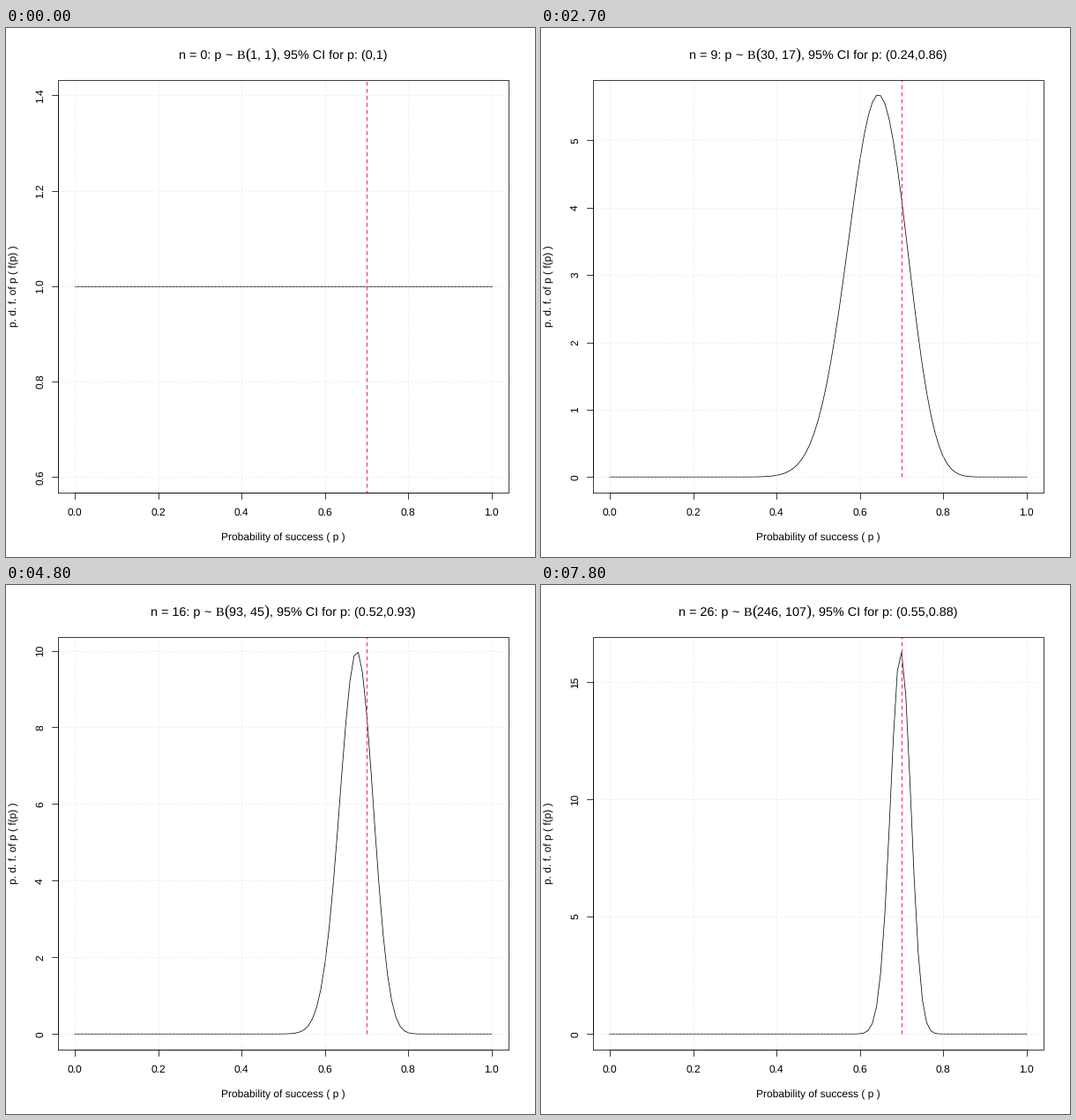
Write a matplotlib script that moves like this. It is 600 px wide and 600 px high and loops after 8 s.

```python
import math

import matplotlib.pyplot as plt
import numpy as np
from matplotlib.animation import FuncAnimation
from matplotlib.patches import Rectangle
from matplotlib.textpath import TextPath

SIZE = 600
INTERVAL = 100
FRAMES = 80
FRAMES_PER_TRIAL = 3
LAST_TRIAL = 26
TRUE_P = 0.7
FAILED_TRIALS = {2, 5, 8, 9, 17, 19, 23}

LEFT, RIGHT, TOP, BOTTOM = 59.04, 569.76, 59.04, 526.56
TICK = 7.2
THIN = 0.75
GRID = "#d3d3d3"
RED = "#ff4060"
SANS, SERIF = "Liberation Sans", "Liberation Serif"

plt.rcParams.update({
    "font.family": SANS,
    "text.hinting": "none",
    "text.hinting_factor": 8,
    "lines.scale_dashes": False,
    "lines.dash_capstyle": "butt",
})

fig = plt.figure(figsize=(SIZE / 72, SIZE / 72), dpi=72, facecolor="white")
ax = fig.add_axes([0, 0, 1, 1])


def beta_pdf(x, a, b):
    return (a + b - 1) * math.comb(a + b - 2, a - 1) * x ** (a - 1) * (1 - x) ** (b - 1)


def beta_quantile(q, a, b):
    """Quantile of a beta distribution with whole-number shapes, by bisection."""
    if a == 0:
        return 0.0
    if b == 0:
        return 1.0
    n = a + b - 1
    low, high = 0.0, 1.0
    for _ in range(40):
        mid = (low + high) / 2
        cdf = sum(math.comb(n, k) * mid ** k * (1 - mid) ** (n - k) for k in range(a, n + 1))
        low, high = (mid, high) if cdf < q else (low, mid)
    return low


def tick_step(span):
    cell = span / 5
    base = 10.0 ** math.floor(math.log10(cell))
    step = base
    for factor, bias in ((2, 0.8), (5, 1.7), (10, 0.8)):
        if factor * base - cell >= bias * (cell - step):
            break
        step = factor * base
    return step


def trial_states():
    """Shapes of the beta density and the interval after each trial."""
    a = b = 1
    wins = losses = 0
    states = [(a, b, 0.0, 1.0)]
    for trial in range(1, LAST_TRIAL + 1):
        if trial in FAILED_TRIALS:
            losses += 1
        else:
            wins += 1
        a += wins
        b += losses
        states.append((a, b, beta_quantile(0.025, wins, losses),
                       beta_quantile(0.975, wins + 1, losses)))
    return states


STATES = trial_states()


def advance(text, family, size):
    def ink(s):
        return TextPath((0, 0), s, size=size, prop={"family": family}).get_extents().width
    return ink("|" + text + "|") - ink("||")


def draw_title(n, a, b, low, high):
    size, gap = 14.4, 4
    pieces = [
        (f"n = {n}: p", SANS, size, gap),
        ("~", SANS, size, gap),
        ("B", SERIF, size, 0),
        ("(", SERIF, 18, 0),
        (f"{a}, {b}", SANS, size, 0),
        (")", SERIF, 18, 0),
        (f", 95% CI for p: ({round(low, 2):g},{round(high, 2):g})", SANS, size, 0),
    ]
    widths = [advance(text, family, s) + space for text, family, s, space in pieces]
    x = (LEFT + RIGHT - sum(widths)) / 2
    for (text, family, s, _), width in zip(pieces, widths):
        ax.text(x, 35, text, family=family, size=s, va="baseline")
        x += width


def line(xs, ys, color="black", **style):
    style.setdefault("lw", THIN)
    return ax.plot(xs, ys, color=color, **style)[0]


def label(x, y, text, rotation=0):
    ax.text(x, y, text, size=12, rotation=rotation, rotation_mode="anchor",
            ha="center", va="baseline")


def x_pixel(x):
    return LEFT + (x + 0.04) / 1.08 * (RIGHT - LEFT)


def draw(frame):
    n = frame // FRAMES_PER_TRIAL
    a, b, low, high = STATES[n]
    xs = np.linspace(0, 1, 101)
    density = beta_pdf(xs, a, b)

    bottom, top = (0.6, 1.4) if n == 0 else (0.0, density.max())
    pad = 0.04 * (top - bottom)
    bottom, top = bottom - pad, top + pad

    def y_pixel(y):
        return BOTTOM - (y - bottom) / (top - bottom) * (BOTTOM - TOP)

    step = tick_step(top - bottom)
    first = math.ceil(bottom / step - 1e-9)
    last = math.floor(top / step + 1e-9)
    y_ticks = [k * step for k in range(first, last + 1)]
    x_ticks = [k / 5 for k in range(6)]
    decimals = 1 if step < 1 else 0

    ax.clear()
    ax.set(xlim=(0, SIZE), ylim=(SIZE, 0))
    ax.axis("off")

    line(x_pixel(xs), y_pixel(density))
    dashed = line([x_pixel(TRUE_P)] * 2, [y_pixel(0), TOP - 40], RED,
                  lw=1.3, ls=(0, (4.5, 3.5)))
    dashed.set_clip_path(Rectangle((LEFT, TOP), RIGHT - LEFT, BOTTOM - TOP,
                                   transform=ax.transData))

    dots = dict(color=GRID, ls=(0, (1, 3)))
    for tick in x_ticks:
        x = x_pixel(tick)
        line([x, x], [BOTTOM, TOP], **dots)
        line([x, x], [BOTTOM, BOTTOM + TICK])
        label(x, 553, f"{tick:.1f}")
    for tick in y_ticks:
        y = y_pixel(tick)
        line([LEFT, RIGHT], [y, y], **dots)
        line([LEFT, LEFT - TICK], [y, y])
        label(42, y, f"{tick:.{decimals}f}", 90)

    line([LEFT, RIGHT, RIGHT, LEFT, LEFT], [BOTTOM, BOTTOM, TOP, TOP, BOTTOM])
    line([x_pixel(0), x_pixel(1)], [BOTTOM, BOTTOM])
    line([LEFT, LEFT], [y_pixel(y_ticks[0]), y_pixel(y_ticks[-1])])

    label((LEFT + RIGHT) / 2, 582, "Probability of success ( p )")
    label(13, (TOP + BOTTOM) / 2, "p. d. f. of p ( f(p) )", 90)
    draw_title(n, a, b, low, high)
    return []


animation = FuncAnimation(fig, draw, frames=FRAMES, interval=INTERVAL,
                          init_func=lambda: [], repeat=True, repeat_delay=0)
plt.show()
```
